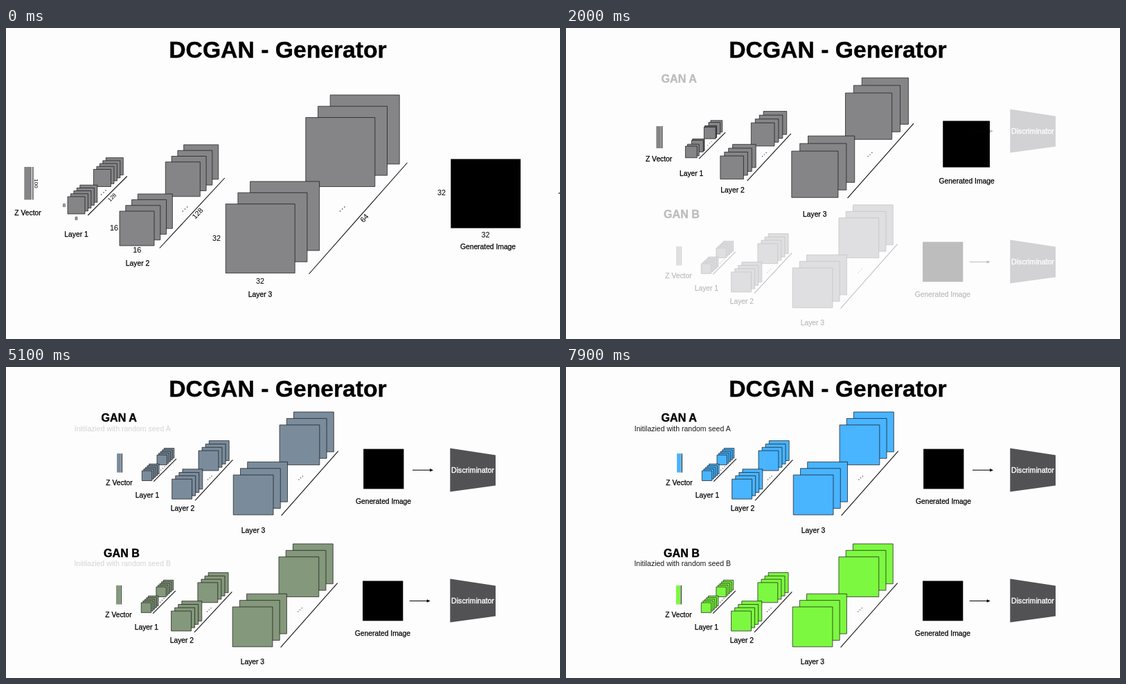
An HTML page for the animation above (8000 ms loop, 800 px wide and 450 px high).

```html
<!DOCTYPE html>
<html lang="en">
<head>
<meta charset="utf-8">
<title>Generator</title>
<style>
  html, body { margin: 0; width: 100%; height: 100%; overflow: hidden; background: #fefdfe; }
  svg { display: block; width: 100vw; height: 100vh; }
  text { font-family: "Liberation Sans", Arial, sans-serif; text-anchor: middle; }
  .label { stroke: #000; stroke-width: .25; }
  .head { font-weight: 700; stroke: #000; stroke-width: .4; }
  .box { fill: var(--tint); stroke: #141414; stroke-width: .7; }
  .box, .line { vector-effect: non-scaling-stroke; }
  .line { stroke: #111; stroke-width: 1.1; }
</style>
</head>
<body>
<svg id="stage" viewBox="0 0 800 450"></svg>
<script>
const LOOP = 8000, STEP = 100;
const END = { s: .578, x: 144.9, y: 9 };
const GREY = [133, 132, 135], BLUE = [73, 180, 255], GREEN = [125, 248, 65];

// front square, size, step between squares, count, back group, slanted line, dots
const LAYERS = [
  { x: 89, y: 244, size: 25, dx: 4.45, dy: -4.2, n: 5, bx: 126.5, by: 204.5, line: [118.3, 271, 174.8, 214.5], dots: [141, 238] },
  { x: 164, y: 265, size: 50, dx: 8.8, dy: -8.3, n: 4, bx: 230.3, by: 193.8, line: [221.8, 318.5, 315.8, 217], dots: [258.5, 262] },
  { x: 317.2, y: 254.6, size: 100, dx: 17.7, dy: -16.3, n: 3, bx: 432.8, by: 129.5, line: [437.4, 356, 579.4, 195], dots: [485.7, 262] }
];
// squares of the first layer trade places during the move
const TRADE = [0, 1, 4, 3, 7, 2, 6, 8, 9, 5];

// text, start x, y, end x, y
const LABELS = [
  ['Z Vector', 31.5, 267.5, 163.5, 167.3],
  ['Layer 1', 101.5, 298, 204, 185.3],
  ['Layer 2', 190, 340.5, 255, 204.2],
  ['Layer 3', 367, 385, 357, 235.8],
  ['Generated Image', 696, 316.5, 545, 194.5]
];

// text, x, y, size, angle
const SIZES = [
  ['100', 43.5, 225, 8, 90], ['8', 84, 256.5, 8, 0], ['8', 101.5, 275.5, 8, 0],
  ['128', 153, 245, 8, -45], ['16', 156, 289.5, 10.8, 0], ['16', 189.3, 321.5, 10.8, 0],
  ['128', 276.5, 268, 10.4, -47], ['32', 304, 304.5, 10.8, 0], ['32', 367, 366, 10.8, 0],
  ['64', 517.5, 275, 10.8, -48], ['32', 629, 238.5, 10.8, 0], ['32', 692.5, 299.5, 10.8, 0]
];

const stage = document.getElementById('stage');
const lerp = (a, b, p) => a + (b - a) * p;
const ramp = (t, a, b) => Math.min(1, Math.max(0, (t - a) / (b - a)));
const ease = u => .5 - .5 * Math.cos(Math.PI * u);

function add(parent, tag, attrs = {}, content = '') {
  const el = document.createElementNS('http://www.w3.org/2000/svg', tag);
  set(el, attrs);
  el.textContent = content;
  return parent.appendChild(el);
}
function set(el, attrs) {
  for (const k in attrs) el.setAttribute(k, attrs[k]);
}
function write(parent, str, x, y, size, attrs = {}) {
  return add(parent, 'text', { x, y: y + size * .36, 'font-size': size, ...attrs }, str);
}
function segment(parent, [x1, y1, x2, y2]) {
  return add(parent, 'line', { x1, y1, x2, y2, class: 'line' });
}

function spots(l) {
  const list = [];
  for (const [x, y] of [[l.x, l.y], [l.bx, l.by]])
    for (let i = 0; i < l.n; i++) list.push([x + i * l.dx, y + i * l.dy]);
  return list;
}

function makeNet(parent) {
  const g = add(parent, 'g');
  const body = add(g, 'g');
  add(body, 'rect', { x: 26.3, y: 201, width: 10.7, height: 47.5, style: 'fill:var(--tint)' });
  segment(body, [38.9, 201, 38.9, 248.5]);
  const stacks = LAYERS.map(l => {
    segment(body, l.line);
    return spots(l).map(() => add(body, 'rect', { width: l.size, height: l.size, class: 'box' })).reverse();
  });
  add(body, 'rect', { x: 642.3, y: 189.6, width: 100.8, height: 100 });
  const dots = LAYERS.map(() => {
    const d = add(g, 'g');
    for (const k of [-1, 0, 1]) add(d, 'circle', { cx: k * 3.2, cy: -k * 3, r: .75, fill: '#222' });
    return d;
  });
  const labels = LABELS.map(([str]) => write(g, str, 0, 0, 10.3, { class: 'label' }));
  return { g, body, stacks, dots, labels };
}

function poseNet(net, p) {
  const s = lerp(1, END.s, p), x = END.x * p, y = END.y * p;
  set(net.body, { transform: `translate(${x} ${y}) scale(${s})` });
  LAYERS.forEach((l, k) => {
    const home = spots(l);
    const now = home.map(([hx, hy], i) => {
      const [ex, ey] = home[k ? i : TRADE[i]];
      return [lerp(hx, ex, p), lerp(hy, ey, p)];
    }).sort((a, b) => a[0] - b[0]);
    now.forEach(([bx, by], i) => set(net.stacks[k][i], { x: bx, y: by }));
    const [dx, dy] = l.dots;
    set(net.dots[k], {
      transform: `translate(${x + dx * s} ${y + dy * s}) scale(${lerp(1, .85, p)})`,
      opacity: k ? 1 : Math.abs(2 * p - 1)
    });
  });
  LABELS.forEach(([, x0, y0, x1, y1], i) =>
    set(net.labels[i], { x: lerp(x0, x1, p), y: lerp(y0, y1, p) + 3.7 }));
}

function makeExtras(parent, name, nameX, nameY, arrowX, arrowY, discY) {
  write(parent, name, nameX, nameY, 16.1, { class: 'head', style: 'text-anchor:start' });
  segment(parent, [arrowX, arrowY, arrowX + 26, arrowY]);
  add(parent, 'path', { d: `M${arrowX + 25} ${arrowY - 2.2}l5 2.2l-5 2.2z` });
  add(parent, 'path', { d: `M641.3 ${discY}L707 ${discY + 10}V${discY + 54}L641.3 ${discY + 63}Z`, fill: '#525154' });
  write(parent, 'Discriminator', 674, discY + 32, 10.6, { fill: '#fff', stroke: '#fff', 'stroke-width': .35 });
}

write(stage, 'DCGAN - Generator', 392.5, 30.9, 33.7, { class: 'head' });

const netA = makeNet(stage);
const sizes = add(stage, 'g');
for (const [str, x, y, size, turn] of SIZES)
  write(sizes, str, x, y, size, { transform: `rotate(${turn} ${x} ${y})` });
segment(sizes, [797.8, 239, 812, 239]);

const fresh = add(stage, 'g');
const netB = makeNet(fresh);
set(netB.g, { transform: 'translate(-1.1 190.9)' });
poseNet(netB, 1);
makeExtras(fresh, 'GAN A', 137.5, 73.7, 587, 149.2, 117.5);
makeExtras(fresh, 'GAN B', 141, 269, 582.7, 338.5, 306.5);

const seeds = add(stage, 'g', { fill: '#1a1a1a' });
write(seeds, 'Initilazied with random seed A', 168.2, 89.7, 10.5);
write(seeds, 'Initilazied with random seed B', 168.2, 284.3, 10.5);

function tint(net, color, p) {
  const rgb = GREY.map((v, i) => Math.round(lerp(v, color[i], p)));
  net.g.style.setProperty('--tint', `rgb(${rgb})`);
}

function draw(time) {
  const t = Math.floor(time % LOOP / STEP) * STEP;
  poseNet(netA, ease(ramp(t, 693, 2595)));
  set(sizes, { opacity: 1 - ramp(t, 650, 1400) });
  set(fresh, { opacity: ramp(t, 1700, 2900) });
  const c = ease(ramp(t, 4700, 6150));
  set(seeds, { opacity: c });
  tint(netA, BLUE, c);
  tint(netB, GREEN, c);
}

const start = performance.now();
function tick() {
  draw(performance.now() - start);
  requestAnimationFrame(tick);
}
tick();
</script>
</body>
</html>
```
